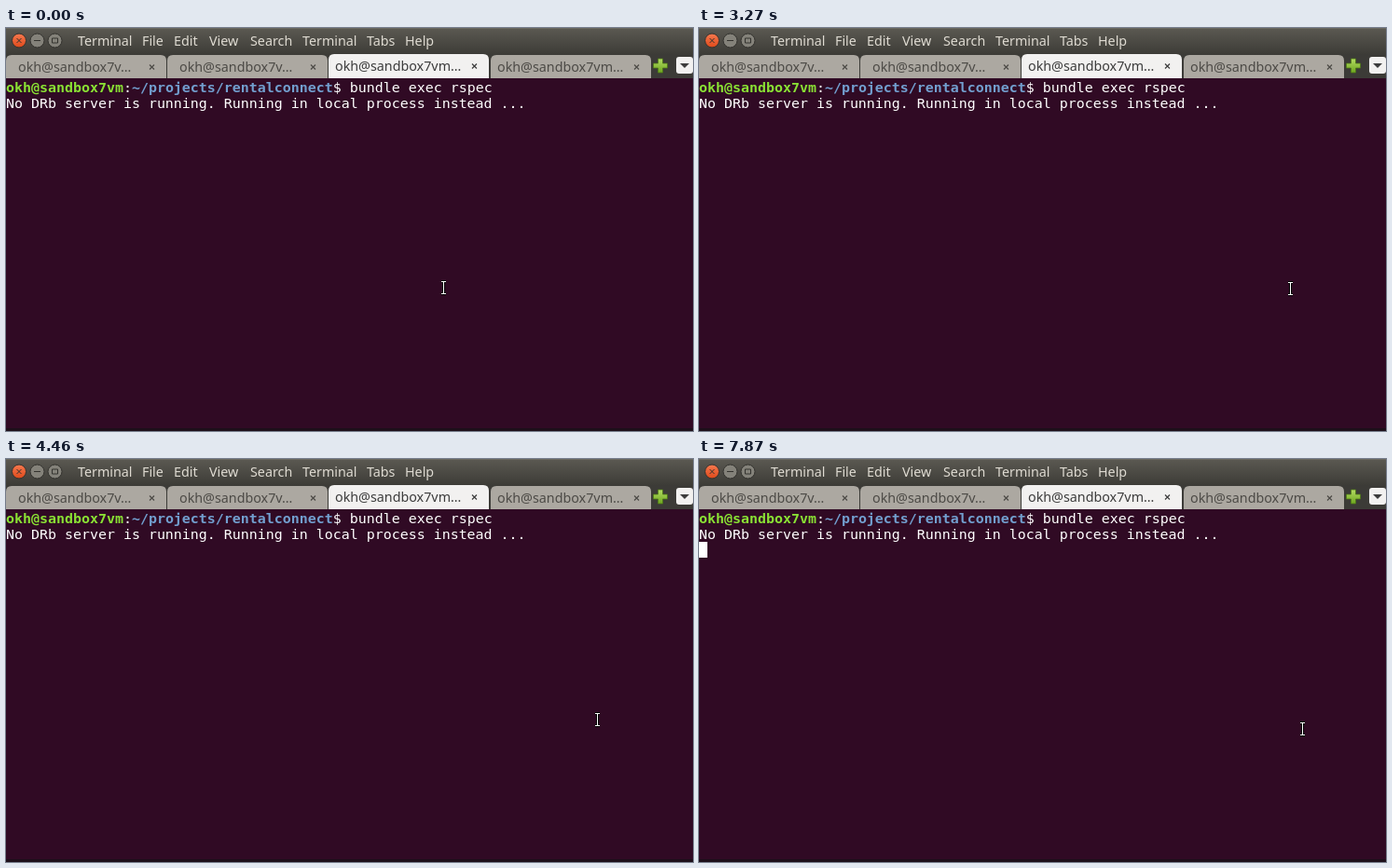
These frames come from a looping animation (737 by 433 pixels, 8 s). An HTML page:

```html
<!DOCTYPE html>
<html lang="en">
<head>
<meta charset="utf-8">
<title>Terminal</title>
<style>
  html, body { margin: 0; width: 100%; height: 100%; overflow: hidden; background: #300a24; }
  svg { display: block; width: 737px; height: 433px; }
  .ui { font: 14.3px "Noto Sans", "Open Sans", sans-serif; }
  .term { font: 14.95px "DejaVu Sans Mono", monospace; fill: #fff; }
  .term .user { font-weight: bold; fill: #8ae234; }
  .term .path { font-weight: bold; fill: #729fcf; }
</style>
</head>
<body>
<svg viewBox="0 0 737 433">
  <defs>
    <linearGradient id="bar" x2="0" y2="1">
      <stop stop-color="#5b5952"/><stop offset="1" stop-color="#3d3c37"/>
    </linearGradient>
    <linearGradient id="red" x2="0" y2="1">
      <stop stop-color="#f6794f"/><stop offset="1" stop-color="#df4a1b"/>
    </linearGradient>
    <linearGradient id="green" x2="0" y2="1">
      <stop stop-color="#b4dc62"/><stop offset="1" stop-color="#6da51f"/>
    </linearGradient>
  </defs>

  <rect width="737" height="433" fill="#300a24"/>
  <rect width="737" height="28" fill="url(#bar)"/>
  <rect width="737" height="1" fill="#6a6860"/>
  <rect y="28" width="737" height="26" fill="#3c3b37"/>
  <rect y="430" width="737" height="3" fill="#1d0f1a"/>

  <g stroke="#33322e" fill="#84827a">
    <circle cx="14" cy="13.5" r="7.5" fill="url(#red)"/>
    <circle cx="33.5" cy="13.5" r="7.5"/>
    <circle cx="52.5" cy="13.5" r="7.5"/>
    <path fill="none" d="M11.5 11l5 5m0-5l-5 5M30 13.5h7M49.5 11h6v5h-6z"/>
  </g>
  <g id="menu" class="ui" fill="#dfdbd2"></g>
  <g id="tabs" class="ui"></g>

  <path d="M699.5 33h5v5h5v5h-5v5h-5v-5h-5v-5h5z" fill="url(#green)" stroke="#4f7a17" stroke-width=".8"/>
  <rect x="719" y="31" width="18" height="18" rx="3" fill="#f2f1f0"/>
  <path d="M723 38h10l-5 5z" fill="#3c3c3c"/>

  <g class="term">
    <text y="69"><tspan class="user">okh@sandbox7vm</tspan>:<tspan class="path">~/projects/rentalconnect</tspan>$ bundle exec rspec</text>
    <text y="86">No DRb server is running. Running in local process instead ...</text>
    <rect id="block" y="89" width="9" height="17"/>
    <g id="progress">
      <text y="103">normalizeTree</text>
      <text x="126" y="103" style="font:18px 'DejaVu Sans',sans-serif">→</text>
      <text x="144" y="103">install</text>
      <rect id="spinner"/>
      <rect x="261" y="89" width="450" height="17" fill="#64475b"/>
      <path d="M255 89h1v17h-1zM258 89h1v17h-1zM252 97h3v1h-3zM714 89h1v17h-1zM717 89h1v17h-1zM718 97h2v1h-2z"/>
    </g>
  </g>

  <g id="pointer" fill="none">
    <path d="M-2 -6.5h5M.5 -6.5v13M-2 6.5h5" stroke="#000" stroke-width="3"/>
    <path d="M-2 -6.5h5M.5 -6.5v13M-2 6.5h5" stroke="#fff"/>
  </g>
</svg>
<script>
const $ = id => document.getElementById(id);

const menu = [["Terminal", 77], ["File", 146], ["Edit", 180], ["View", 218],
  ["Search", 262], ["Terminal", 318], ["Tabs", 387], ["Help", 428]];
$("menu").innerHTML = menu.map(([word, x]) => `<text x="${x}" y="19">${word}</text>`).join("");

function tab(label, x, textX, active) {
  const top = active ? 28 : 29, mid = top + 13, ink = active ? "#3c3c3c" : "#4c4a46";
  return `<path d="M${x} 54V${top + 6}q0 -6 6 -6h160q6 0 6 6V54z" fill="${active ? "#f2f1f0" : "#aca8a1"}"/>
    <text x="${textX}" y="${top + 18}" fill="${ink}">${label}</text>
    <path d="M${x + 154} ${mid - 2.5}l5 5m0-5l-5 5" stroke="${ink}" stroke-width="1.2"/>`;
}
$("tabs").innerHTML = tab("okh@sandbox7v…", 0, 13) + tab("okh@sandbox7v…", 173, 186)
  + tab("okh@sandbox7vm…", 346, 353, true) + tab("okh@sandbox7vm…", 520, 527);

const LOOP = 8000;
// Times at which the block cursor flips, starting hidden
const blinks = [320, 900, 1500, 2080, 2680, 3270, 4160, 4460, 5050, 5650, 6240, 6830, 7430];
// Time, x, y of the mouse pointer
const moves = [[0, 469, 279], [170, 492, 279], [320, 534, 280], [470, 578, 281], [610, 597, 281],
  [1050, 595, 280], [1650, 618, 280], [1790, 634, 280], [7130, 636, 282], [7280, 638, 285],
  [7430, 639, 287], [7720, 643, 288], [7870, 647, 290]];

const show = (id, on) => $(id).setAttribute("visibility", on ? "visible" : "hidden");

function spin(x, y, width, height) {
  Object.entries({ x, y, width, height }).forEach(([k, v]) => $("spinner").setAttribute(k, v));
}

function draw(t) {
  const [, x, y] = moves.filter(m => m[0] <= t).pop();
  $("pointer").setAttribute("transform", `translate(${x} ${y})`);
  show("block", blinks.filter(b => b <= t).length % 2);
  show("progress", t >= 3420 && t < 3870);
  if (t < 3570) spin(234, 89, 5, 17);
  else spin(234, 89, 9, 8);
}

const start = performance.now();
function tick() {
  draw((performance.now() - start) % LOOP);
  requestAnimationFrame(tick);
}
tick();
</script>
</body>
</html>
```
